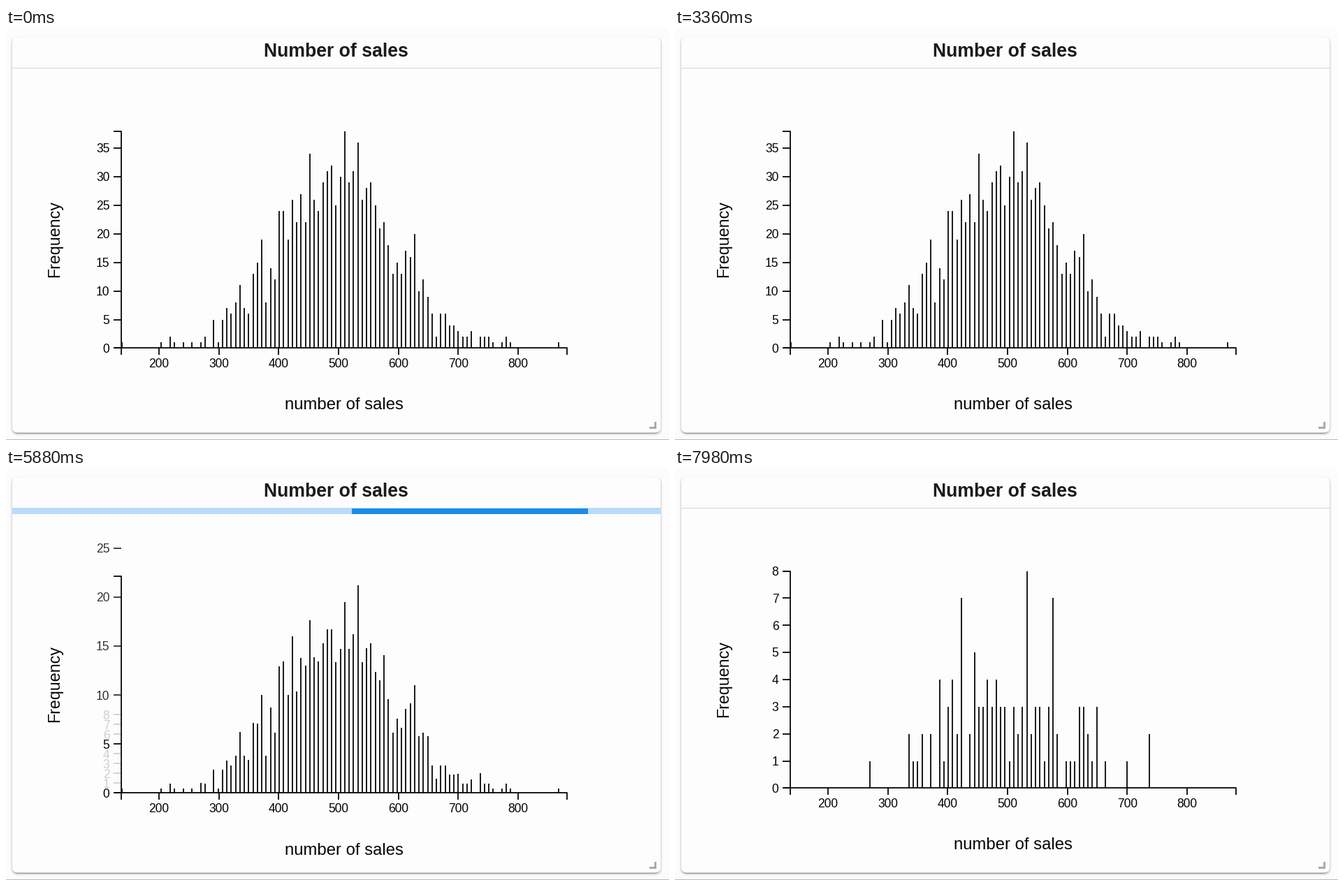
A matplotlib script for the animation above (8 s loop, 949x590 px).

```python
import numpy as np
import matplotlib.pyplot as plt
from matplotlib.animation import FuncAnimation
from matplotlib.collections import LineCollection
from matplotlib.patches import FancyBboxPatch, Polygon, Rectangle
from matplotlib.transforms import Affine2D

W, H, DPI = 949, 590, 64
LOOP, STEP = 8000, 20
PT = 72 / DPI
INK = "#050505"
SANS = "Liberation Sans"

# chart geometry in pixels
X0, X1, BASE, TOP = 165.4, 803.2, 458.4, 147.6
BIN = 6.25
UNIT_A, UNIT_B = (BASE - TOP) / 38, (BASE - TOP) / 8

# timing in ms
BAR_ON, BAR_OFF = 3820, 7050
TWEEN_AT, TWEEN_LEN = 5227, 1803
BAR_SHIFT = 7


def counts(start, dense, sparse):
    out = np.zeros(101)
    out[start:start + len(dense)] = dense
    for k, v in sparse.items():
        out[k] = v
    return out


before = counts(
    21,
    [5, 1, 5, 7, 6, 8, 11, 7, 6, 13, 15, 19, 8, 14, 12, 24, 24, 19, 26, 22, 27,
     22, 34, 26, 24, 29, 31, 32, 25, 30, 38, 29, 31, 36, 26, 28, 29, 25, 21, 22,
     18, 13, 15, 13, 17, 16, 20, 10, 12, 9, 6, 2, 6, 6, 4, 4, 3, 2, 2, 3],
    {0: 1, 9: 1, 11: 2, 12: 1, 14: 1, 16: 1, 18: 1, 19: 2, 82: 2, 83: 2, 84: 2,
     85: 1, 87: 1, 88: 2, 89: 1, 100: 1})
after = counts(
    27,
    [2, 1, 1, 2, 0, 2, 0, 4, 1, 3, 4, 2, 7, 0, 2, 5, 3, 3, 4, 3, 4, 3, 3, 1, 3,
     2, 3, 8, 2, 3, 3, 1, 3, 7, 2, 0, 1, 1, 1, 3, 3, 2, 1, 3, 0, 1],
    {18: 1, 77: 1, 82: 2})

# the last long run sits one bin past the gap at 610 px
before_x = 166.2 + BIN * np.arange(101)


def lerp(a, b, p):
    return a + (b - a) * p


def cubic_in_out(u):
    u = min(max(u, 0), 1)
    return 4 * u ** 3 if u < 0.5 else 1 - 4 * (1 - u) ** 3


S = np.linspace(0, 1, 400)
EASE_X = 0.75 * (1 - S) ** 2 * S + 0.75 * (1 - S) * S ** 2 + S ** 3
EASE_Y = 0.3 * (1 - S) ** 2 * S + 3 * (1 - S) * S ** 2 + S ** 3


def progress_span(t):
    """Left and right ends of the running bar, as fractions of the track."""
    run = np.interp(t, [BAR_ON, 4080, 5340, 6320, 7420], [0, 106, 441, 888, 1320])
    e = np.interp(run / 1320, EASE_X, EASE_Y)
    return np.clip([-2 + 3.07 * e, 1.08 * e], 0, 1)


fig = plt.figure(figsize=(W / DPI, H / DPI), dpi=DPI, facecolor="#fcfcfd")
ax = fig.add_axes([0, 0, 1, 1])
ax.set(xlim=(0, W), ylim=(H, 0))
ax.axis("off")


def rounded(x, y, w, h, r, z=1, **style):
    box = FancyBboxPatch((x, y), w, h, zorder=z, linewidth=0,
                         boxstyle=f"round,pad=0,rounding_size={r}", **style)
    ax.add_patch(box)


def rect(x, y, w, h, color, z=2):
    patch = Rectangle((x, y), w, h, color=color, linewidth=0, zorder=z)
    return ax.add_patch(patch)


def label(x, y, s, size, **style):
    style = {"ha": "center", "va": "baseline", "color": INK, **style}
    return ax.text(x, y, s, fontsize=size * PT, family=SANS, zorder=4, **style)


# card with its soft shadow
for grow, alpha in ((3, 0.025), (2, 0.04), (1, 0.07)):
    rounded(9 - grow, 13.5 - grow + 1.5, 928 + 2 * grow, 566 + 2 * grow, 8 + grow,
            facecolor="black", alpha=alpha)
rounded(10, 30, 926, 551, 8, facecolor="black", alpha=0.28)
rounded(9, 13, 928, 566.5, 8, z=1.5, facecolor="#fdfdfd")
rect(0, 589, W, 1, "#b8b8bc")
rect(9, 56.5, 928, 1.7, "#d6d6e0")
ax.add_patch(Polygon([(928.5, 563.5), (931.5, 563.5), (931.5, 574), (921, 574),
                      (921, 571), (928.5, 571)], color="#a9a9b0", linewidth=0, zorder=3))
label(472.5, 41, "Number of sales", 26.6, weight="bold", color="#1b1b1f")

track = rect(9, 57.3, 928, 8.4, "#badbfa", 3)
runner = rect(9, 57.8, 0, 7.9, "#1d8ce9", 3.5)

# everything in the chart moves down together while the bar is shown
shift = Affine2D()
chart = shift + ax.transData


def lines(segments, width):
    group = LineCollection(segments, colors=INK, linewidths=width * PT,
                           transform=chart, zorder=4, capstyle="butt")
    return ax.add_collection(group, autolim=False)


marks = range(200, 801, 100)
mark_x = [218.9 + 0.857 * (m - 200) for m in marks]
frame = [[(X0 - 11, TOP), (X0, TOP), (X0, BASE), (X0 - 11, BASE)],
         [(X0, BASE + 9.5), (X0, BASE), (X1, BASE), (X1, BASE + 9.5)]]
lines(frame, 1.8)
lines([[(x, BASE), (x, BASE + 9.5)] for x in mark_x], 1.8)
for m, x in zip(marks, mark_x):
    label(x, 486.3, str(m), 17.5, transform=chart)
label(483.5, 546.5, "number of sales", 23.9, transform=chart)
label(76.5, 302, "Frequency", 23.3, rotation=90, rotation_mode="anchor",
      transform=chart)

bars = lines([], 1.8)
ticks = lines([], 1.8)
old_ticks, new_ticks = set(range(0, 36, 5)), set(range(9))
tick_values = sorted(old_ticks | new_ticks)
tick_text = [label(148.5, 0, str(v), 17.5, ha="right", transform=chart)
             for v in tick_values]


def tick_alpha(v, p):
    return lerp(float(v in old_ticks), float(v in new_ticks), p)


def draw(i):
    t = i * STEP
    loading = BAR_ON <= t < BAR_OFF
    shift.clear().translate(0, BAR_SHIFT if loading else 0)

    track.set_visible(loading)
    runner.set_visible(loading)
    left, right = progress_span(t)
    runner.set_x(9 + 928 * left)
    runner.set_width(928 * (right - left))

    p = cubic_in_out((t - TWEEN_AT) / TWEEN_LEN)
    heights = lerp(before * UNIT_A, after * UNIT_B, p)
    bars.set_segments([[(x, BASE), (x, BASE - h)]
                       for x, h in zip(before_x, heights) if h > 0.2])

    segments, colors = [], []
    for v, text in zip(tick_values, tick_text):
        y = BASE - v * lerp(UNIT_A, UNIT_B, p)
        a = tick_alpha(v, p)
        shown = a > 0.004 and y > 70
        text.set_visible(shown)
        if shown:
            text.set_y(y + 6.2)
            text.set_alpha(a)
            segments.append([(X0 - 11, y), (X0, y)])
            colors.append((0.02, 0.02, 0.02, a))
    ticks.set_segments(segments)
    ticks.set_color(colors)
    return [track, runner, bars, ticks, *tick_text]


anim = FuncAnimation(fig, draw, frames=LOOP // STEP, interval=STEP,
                     init_func=lambda: draw(0), repeat=True, repeat_delay=0)
plt.show()
```
